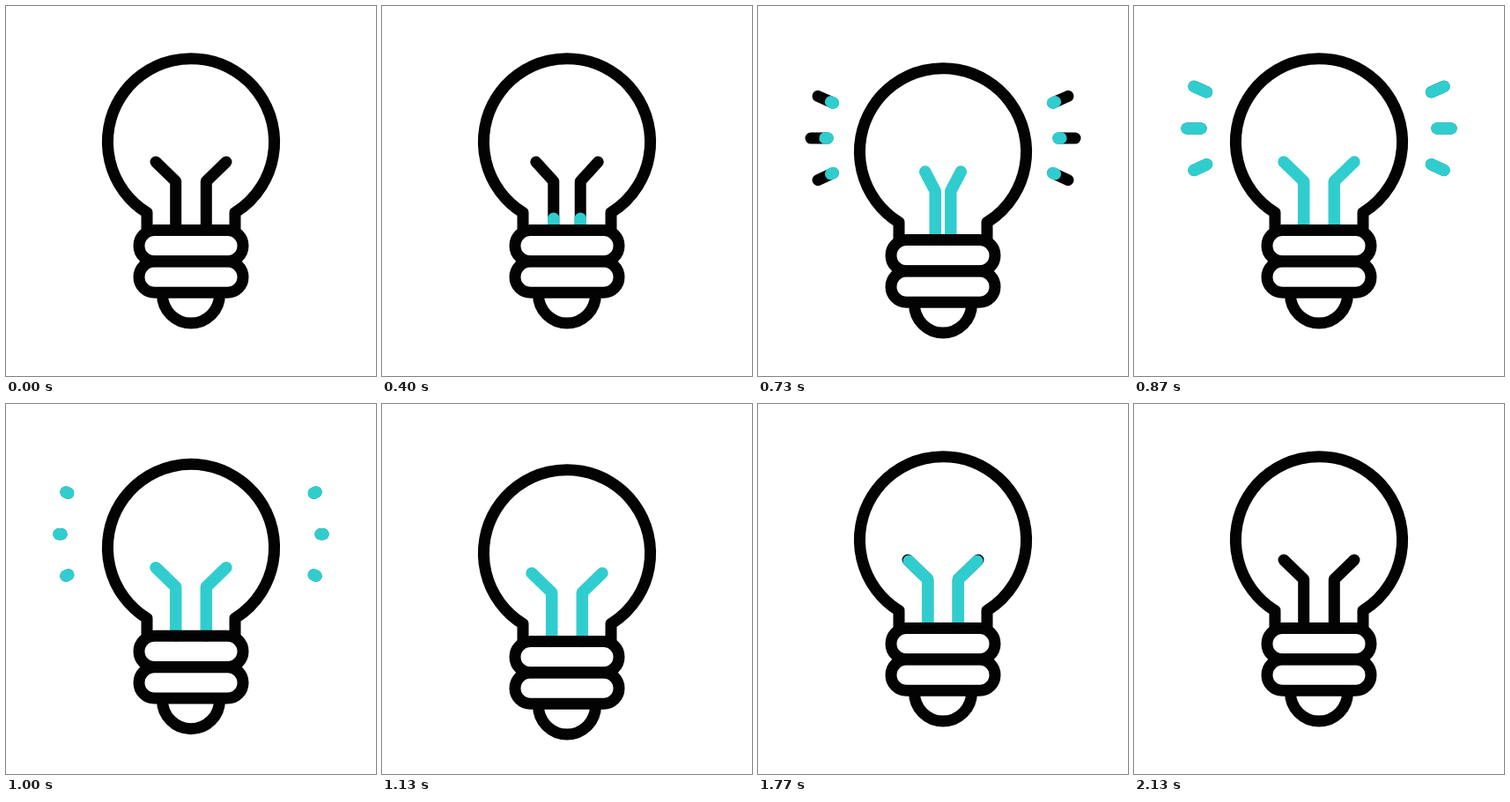
Recreate the animation shown at these times as an HTML page with a canvas. Size 420x420 px, loop 2500 ms.

```html
<!DOCTYPE html>
<html lang="en">
<head>
<meta charset="utf-8">
<title>Light bulb</title>
<style>
  html, body { margin: 0; width: 100%; height: 100%; overflow: hidden; background: #fff; }
  canvas { display: block; width: 100vw; height: 100vh; }
</style>
</head>
<body>
<canvas id="stage" width="420" height="420"></canvas>
<script>
const ctx = document.getElementById('stage').getContext('2d');
const LOOP = 2500, BLACK = '#030303', TEAL = '#30cdcf';
const CENTER = 210;

// Upper, middle and lower ray on the left: inner point, outer point
const RAYS = [
  [[85.3, 99], [68, 91.3]],
  [[79, 139], [60, 139]],
  [[85.3, 178.5], [68, 186.5]]
];

const lerp = (a, b, k) => a + (b - a) * k;

// Eased progress between two ticks
function ease(tick, from, to) {
  const k = Math.min(1, Math.max(0, (tick - from) / (to - from)));
  return k * k * (3 - 2 * k);
}

// Rise and fall, with an optional hold at the top
const pulse = (tick, start, top, leave, end) =>
  ease(tick, start, top) - ease(tick, leave, end);

function stroke(color, trace) {
  ctx.strokeStyle = color;
  ctx.lineWidth = color === TEAL ? 13.5 : 13;
  ctx.beginPath();
  trace();
  ctx.stroke();
}

function polyline(points) {
  points.forEach(([x, y], i) => i ? ctx.lineTo(x, y) : ctx.moveTo(x, y));
}

function drawFilament(tick) {
  const width = 1 - 0.55 * pulse(tick, 9, 19, 21, 26);
  const lit = ease(tick, 9, 21) - ease(tick, 52, 64);
  const length = 55.5 + Math.hypot(22.7 * width, 22);
  for (const side of [-1, 1]) {
    const stem = CENTER + side * 17.3 * width;
    const tip = CENTER + side * 40 * width;
    const trace = () => polyline([[stem, 254.5], [stem, 199], [tip, 177]]);
    if (lit < 1) stroke(BLACK, trace);
    if (lit > 0) {
      if (lit < 1) ctx.setLineDash([length * lit, 1000]);
      stroke(TEAL, trace);
      ctx.setLineDash([]);
    }
  }
}

function drawRays(tick) {
  const tail = ease(tick, 24, 32);
  const layers = [[BLACK, ease(tick, 14, 22)], [TEAL, ease(tick, 20.7, 26)]];
  for (const [color, head] of layers) {
    if (head <= tail) continue;
    for (const [inner, outer] of RAYS) {
      const ends = [tail, head].map(k => [lerp(inner[0], outer[0], k), lerp(inner[1], outer[1], k)]);
      stroke(color, () => polyline(ends));
      stroke(color, () => polyline(ends.map(([x, y]) => [2 * CENTER - x, y])));
    }
  }
}

function drawBulb() {
  const radius = 94.6, neck = 50;
  const angle = Math.PI - Math.acos(neck / radius);
  stroke(BLACK, () => {
    ctx.moveTo(CENTER - neck, 254.5);
    ctx.arc(CENTER, 154.3, radius, angle, Math.PI - angle);
    ctx.lineTo(CENTER + neck, 254.5);
  });
  for (const y of [254.5, 290]) {
    stroke(BLACK, () => ctx.roundRect(151, y, 118, 35.3, 17.6));
  }
  stroke(BLACK, () => ctx.arc(CENTER, 327.5, 32.5, Math.PI, 0, true));
}

function render(now) {
  const tick = Math.floor((now % LOOP) * 0.03 + 0.101);
  const drop = 15.5 * (pulse(tick, 12, 19.8, 19.8, 26) + pulse(tick, 26, 33.4, 33.4, 39));
  ctx.setTransform(1, 0, 0, 1, 0, 0);
  ctx.fillStyle = '#fff';
  ctx.fillRect(0, 0, 420, 420);
  ctx.translate(0, drop);
  ctx.lineCap = ctx.lineJoin = 'round';
  drawFilament(tick);
  drawRays(tick);
  drawBulb();
}

let start;
function loop(now) {
  start ??= now;
  render(now - start);
  requestAnimationFrame(loop);
}
render(0);
requestAnimationFrame(loop);
</script>
</body>
</html>
```
